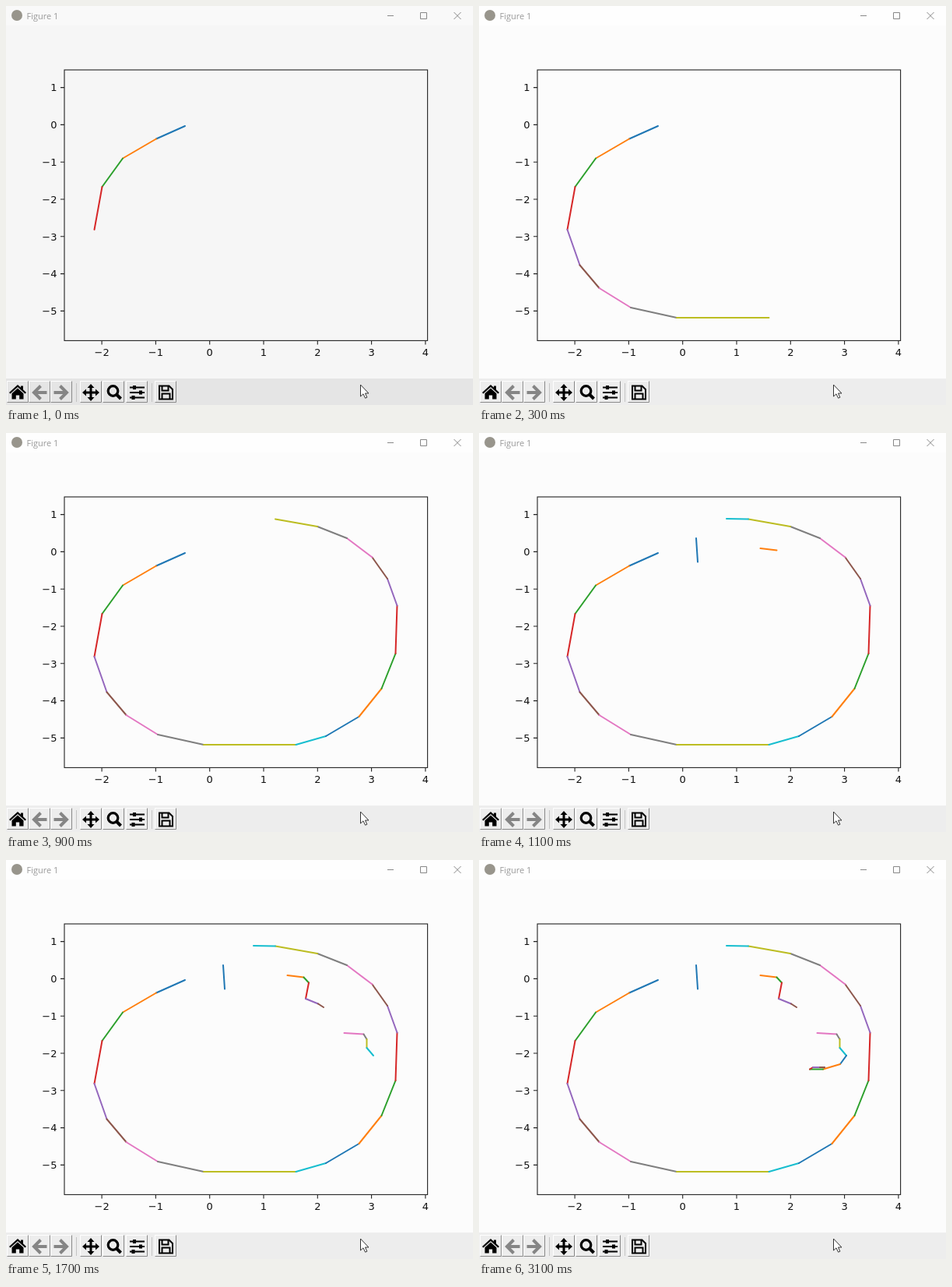
An HTML page for the animation above (4 s loop, 600 by 512 pixels).

```html
<!DOCTYPE html>
<html>
<head>
<meta charset="utf-8">
<style>
html, body { margin: 0; width: 100%; height: 100%; overflow: hidden; }
svg { display: block; }
.labels { font: 13px "DejaVu Sans", sans-serif; fill: #111; }
.title { font: 11px "Open Sans", sans-serif; fill: #999; }
.thin { fill: none; stroke: #222; stroke-width: 1.1; }
.line { fill: none; stroke: #000; }
</style>
</head>
<body>
<svg width="600" height="512" viewBox="0 0 600 512">
  <rect id="page" width="600" height="512"/>
  <rect id="header" width="600" height="25"/>
  <rect id="toolbar" y="478" width="600" height="34"/>

  <circle cx="14" cy="12" r="7" fill="#98958c"/>
  <text class="title" x="26.5" y="16.5">Figure 1</text>
  <path fill="none" stroke="#888" d="M490 12.5h8M532.5 8.500h8v8h-8zM575.500 8l9 9m0-9l-9 9"/>

  <rect class="thin" x="75" y="82" width="466.600" height="347.400"/>
  <path id="ticks" class="thin"/>
  <g id="labels" class="labels"></g>
  <g id="plot" fill="none" stroke-width="2" stroke-linecap="round"></g>

  <g id="buttons" fill="none"></g>
  <path stroke="#c4c4c4" d="M90.500 484v24M187.500 484v24"/>
  <path d="M15 486l4 3.600v-2h3v4.600l4 3.800-1.500 1.500L15 489l-9.500 8.500L4 496zM15 490.500l7.500 6.700v7.300h-5.300v-5h-4.400v5H7.500v-7.300z"/>
  <path class="line" style="stroke:#858585" stroke-width="4" d="M44.500 487.500l-8.500 8.500 8.500 8.500M37 496h15.500M69.500 487.500l8.500 8.500-8.500 8.500M77 496H61.500"/>
  <path class="line" stroke-width="3" d="M109 488v16M101 496h16"/>
  <path d="M109 485l4.500 5h-9zM109 507l4.500-5h-9zM98 496l5-4.500v9zM120 496l-5-4.500v9z"/>
  <circle class="line" cx="137.500" cy="494" r="6.300" stroke-width="3.200"/>
  <path class="line" stroke-width="4" d="M142 498.500l5.500 5.500"/>
  <path class="line" stroke-width="2" d="M159 489.500h19M159 496h19M159 502.500h19"/>
  <path class="line" stroke-width="4" d="M165 487v5M173 493.500v5M163.500 500v5"/>
  <path class="line" stroke-width="2" d="M197 487.500h12.500l4.500 4.500v12.500h-17zM200.500 488v5.500h8V488M200.500 504v-6.500h10v6.500"/>
  <path fill="#fff" stroke="#333" d="M455.500 486v15l3.500-3.200 2.600 5.400 2.300-1-2.400-5.200h4.500z"/>
</svg>
<script>
const COLORS = ['#1f77b4', '#ff7f0e', '#2ca02c', '#d62728', '#9467bd',
                '#8c564b', '#e377c2', '#7f7f7f', '#bcbd22', '#17becf'];
const STROKES = [
  '230,154 193,170.5 150,195.5 123.500,232 113.500,287 129.500,332.5 154.500,362 195,387 254,400 372.500,400 ' +
  '411,389 453.500,364 482.500,328 500.500,283 502.500,221.5 490,187 470.500,159.5 438,135 400,120 346,110.5 318,110',
  '279,135 281,165.5',
  '361.500,148 382.500,150.5 389,157.5 385,178 401,184.5 408,189',
  '434.500,222 459.500,223.5 463.500,230 463.500,241 472,251 464,262 442,268.5 425,268.5 429,266 444,266 438,266'
];
const el = id => document.getElementById(id);
const add = (parent, name, attrs) => {
  const node = document.createElementNS('http://www.w3.org/2000/svg', name);
  for (const key in attrs) node.setAttribute(key, attrs[key]);
  return el(parent).appendChild(node);
};

let ticks = '';
const label = (value, x, y, anchor) => {
  add('labels', 'text', { x, y, 'text-anchor': anchor }).textContent = String(value).replace('-', '\u2212');
};
for (let v = -2; v <= 4; v++) {
  const x = 261.700 + v * 69.300;
  ticks += `M${x} 429.400v5`;
  label(v, x, 448.500, 'middle');
}
for (let v = -5; v <= 1; v++) {
  const y = 152.400 - v * 47.800;
  ticks += `M75 ${y}h-5`;
  label(v, 65.500, y + 4.700, 'end');
}
el('ticks').setAttribute('d', ticks);

for (const x of [1.5, 29.5, 57.5, 95.5, 124.5, 154.5, 191.5]) {
  add('buttons', 'path', { d: `M${x} 508.500v-27h27`, stroke: '#fff' });
  add('buttons', 'path', { d: `M${x} 508.500h27v-27`, stroke: '#8a8a8a' });
}

const segments = [];
for (const stroke of STROKES) {
  const points = stroke.split(' ');
  for (let i = 1; i < points.length; i++) {
    segments.push(add('plot', 'path', {
      d: `M${points[i - 1]}L${points[i]}`,
      stroke: COLORS[segments.length % 10]
    }));
  }
}

// Segments appear in 100 ms steps, a little slower near the end.
function draw(t) {
  const step = Math.min(Math.floor(t / 100), 21);
  const count = step <= 14 ? 4 + Math.floor(step * 5 / 3) : 27 + Math.floor((step - 14) * 1.3);
  segments.forEach((s, i) => s.setAttribute('visibility', i < count ? 'visible' : 'hidden'));
  const dim = step === 0;
  el('page').setAttribute('fill', dim ? '#f6f6f6' : '#fcfcfc');
  el('header').setAttribute('fill', dim ? '#f9f9f9' : '#fefefe');
  el('toolbar').setAttribute('fill', dim ? '#e5e5e5' : '#ededed');
}
const start = performance.now();
function tick() {
  draw((performance.now() - start) % 4000);
  requestAnimationFrame(tick);
}
tick();
</script>
</body>
</html>
```
